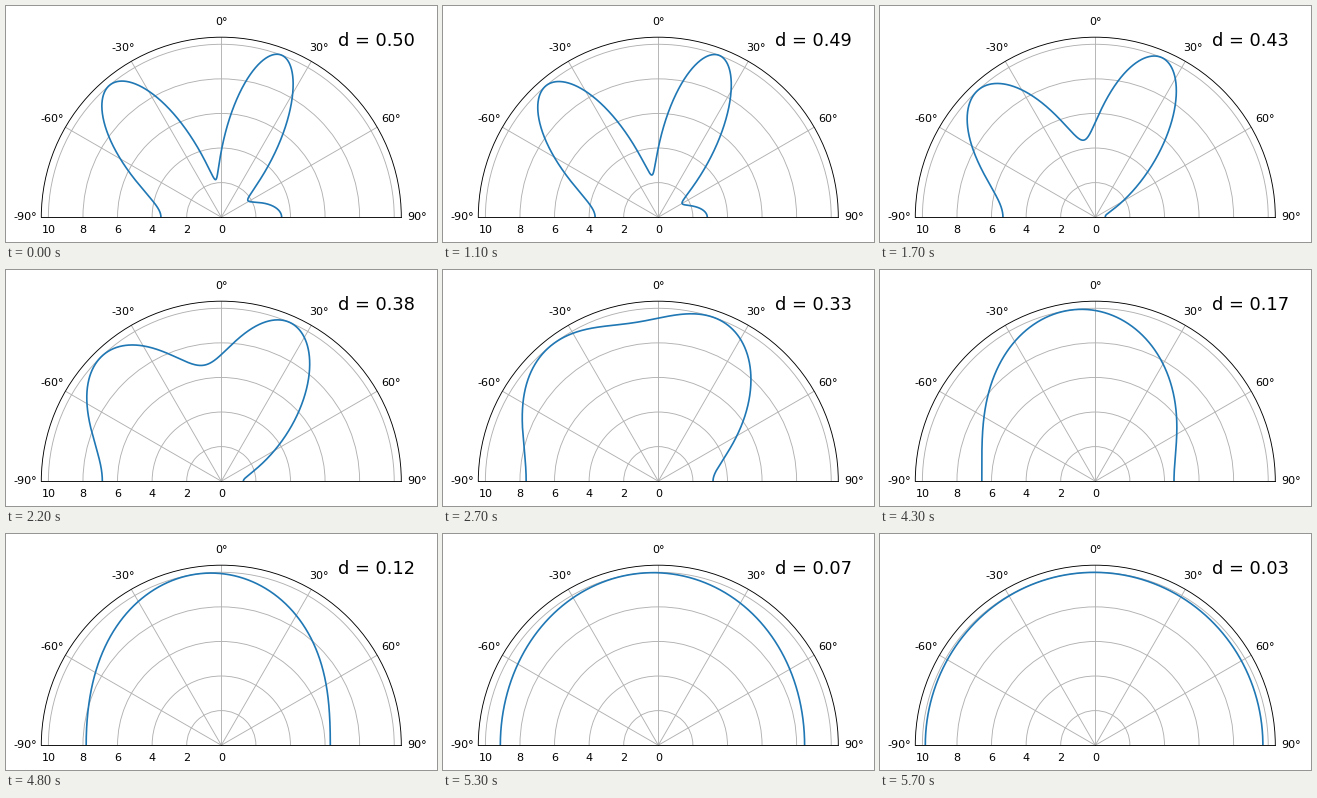
These frames come from a looping animation (431 px wide and 236 px high, 5800 ms). A matplotlib script:

```python
import matplotlib.pyplot as plt
import numpy as np
from matplotlib.animation import FuncAnimation

W, H, DPI = 431, 236, 80
FRAMES, INTERVAL, HOLD = 58, 100, 10
ELEMENTS = 3
SOURCES = np.deg2rad([20, -40])
RADIUS, CENTER_X, BASE_Y = 180, 215.3, 24.8

theta = np.linspace(-np.pi / 2, np.pi / 2, 2001)


def spacing(frame):
    """Element spacing in wavelengths: held at first, then shrinking."""
    return 0.5 - 0.01 * max(0, frame - HOLD)


def response(d):
    """Power of a conventional beamformer hearing two equal sources."""
    n = np.arange(ELEMENTS)[:, None]
    power = np.zeros_like(theta)
    for source in SOURCES:
        phase = 2 * np.pi * d * (np.sin(theta) - np.sin(source))
        power += np.abs(np.exp(1j * n * phase).sum(axis=0)) ** 2
    return 10 * power / power.max()


fig = plt.figure(figsize=(W / DPI, H / DPI), dpi=DPI, facecolor="white")
# The half disc sits centred in a square box, a quarter of its height up.
ax = fig.add_axes(
    [(CENTER_X - RADIUS) / W, (BASE_Y - RADIUS / 2) / H,
     2 * RADIUS / W, 2 * RADIUS / H],
    projection="polar",
)
ax.set_theta_zero_location("N")
ax.set_theta_direction(-1)
ax.set_thetamin(-90)
ax.set_thetamax(90)
ax.set_xticks(np.deg2rad(np.arange(-90, 91, 30)))
ax.set_ylim(0, 10.41)
ax.set_yticks(range(0, 11, 2))

line, = ax.plot(theta, response(0.5))
label = fig.text(332 / W, 196 / H, "d = 0.50", fontsize=16)


def update(frame):
    d = spacing(frame)
    line.set_ydata(response(d))
    label.set_text(f"d = {d:.2f}")
    return line, label


anim = FuncAnimation(fig, update, frames=FRAMES, interval=INTERVAL,
                     repeat=True, repeat_delay=0)
plt.show()
```
